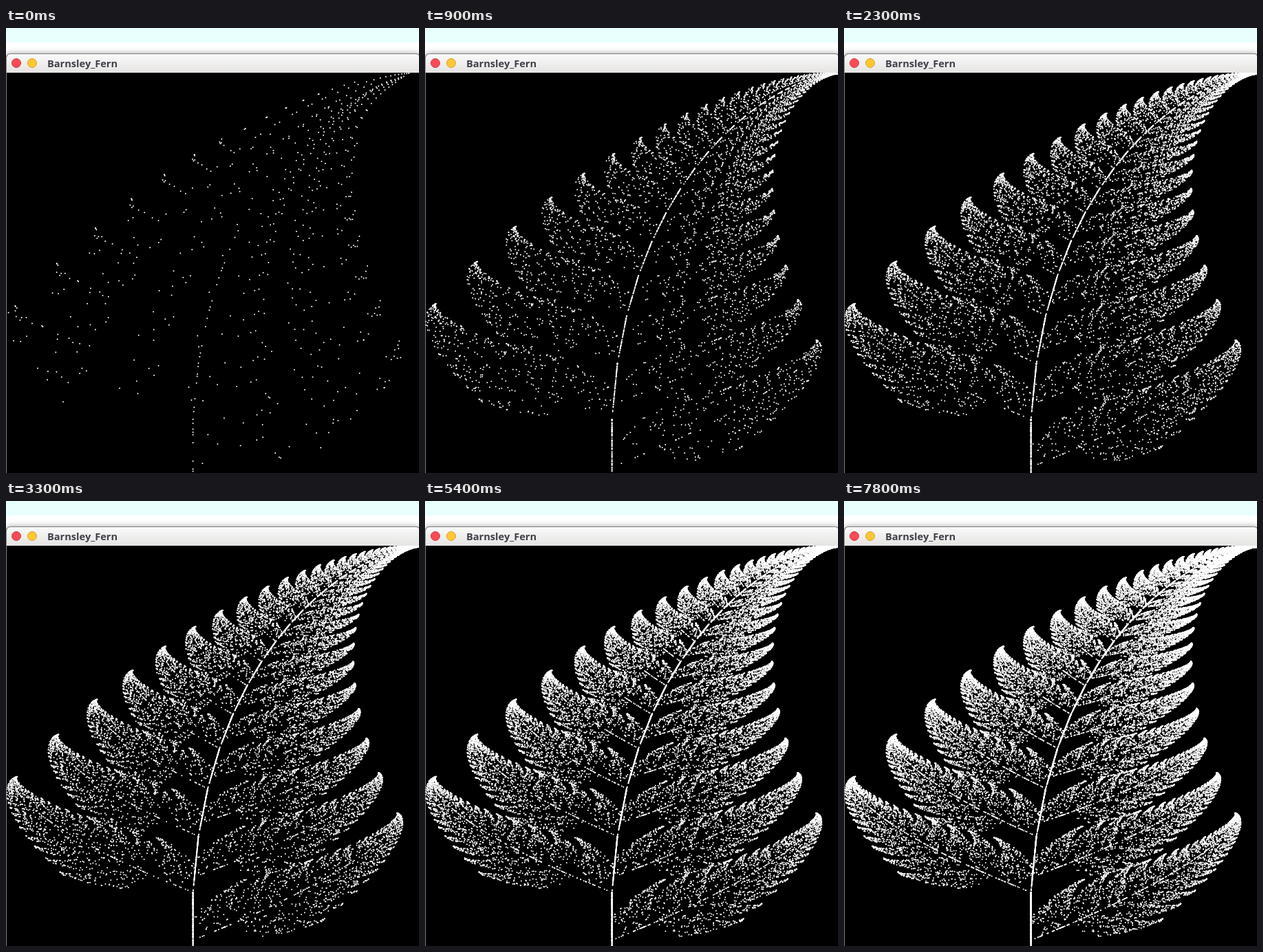
Recreate the animation shown at these times as an HTML page with a canvas. Size 600 by 647 pixels, loop 8 s.

```html
<!DOCTYPE html>
<html lang="en">
<head>
<meta charset="utf-8">
<title>Barnsley_Fern</title>
<style>
  html, body { margin: 0; width: 100%; height: 100%; overflow: hidden; background: #fff; }
  .stage { position: relative; width: 600px; height: 647px; overflow: hidden; }
  .stage > * { position: absolute; }
  .strip { left: 0; top: 0; width: 600px; height: 21px; background: #e8fffd; }
  .window {
    left: 0; top: 37px; width: 602px; height: 640px; box-sizing: border-box;
    border: 1px solid #828282; border-radius: 6px 6px 0 0; background: #000;
    box-shadow: 0 0 9px rgba(0, 0, 0, .38);
  }
  .bar {
    left: 1px; top: 38px; width: 600px; height: 27px; border-radius: 5px 5px 0 0;
    background: linear-gradient(#fafafa, #e5e4e3);
  }
  .button { top: 44px; width: 14px; height: 14px; box-sizing: border-box; border-radius: 50%; }
  .close { left: 8px; background: #fb4b56; border: 1px solid #cf3f47; }
  .shrink { left: 31px; background: #fdc834; border: 1px solid #d9a02f; }
  .title {
    left: 60px; top: 41px; line-height: 21px; white-space: nowrap; color: #40404a;
    font: 700 14.6px/21px "Open Sans", "Noto Sans", sans-serif;
  }
  canvas { left: 1px; top: 65px; }
</style>
</head>
<body>
<div class="stage">
  <div class="strip"></div>
  <div class="window"></div>
  <div class="bar"></div>
  <div class="button close"></div>
  <div class="button shrink"></div>
  <div class="title">Barnsley_Fern</div>
  <canvas width="599" height="582"></canvas>
</div>
<script>
const LOOP = 8000, FIRST = 650, RATE = 5.9, SIZE = 600;
const ctx = document.querySelector('canvas').getContext('2d');

// The drawing advances every 100 ms at first, then at irregular moments.
const lateSteps = [3300, 3500, 3700, 4000, 4200, 4300, 4800, 5000, 5200, 5400,
  5600, 5800, 6200, 6500, 6600, 6800, 7000, 7100, 7600, 7800];

function lastStep(t) {
  let step = Math.min(Math.floor(t / 100) * 100, 2400);
  for (const s of lateSteps) if (s <= t) step = s;
  return step;
}

const countAt = t => Math.round(FIRST + RATE * lastStep(t));

function seeded(a) {
  return () => {
    a = (a + 0x6D2B79F5) | 0;
    let t = Math.imul(a ^ (a >>> 15), 1 | a);
    t = (t + Math.imul(t ^ (t >>> 7), 61 | t)) ^ t;
    return ((t ^ (t >>> 14)) >>> 0) / 4294967296;
  };
}

function nextPoint(x, y, r) {
  if (r < 0.01) return [0, 0.16 * y];
  if (r < 0.86) return [0.85 * x + 0.04 * y, -0.04 * x + 0.85 * y + 1.6];
  if (r < 0.93) return [0.2 * x - 0.26 * y, 0.23 * x + 0.22 * y + 1.6];
  return [-0.15 * x + 0.28 * y, 0.26 * x + 0.24 * y + 0.44];
}

function growFern(total) {
  const random = seeded(7), points = new Float32Array(total * 2);
  let x = 0, y = 0;
  for (let i = 0; i < total; i++) {
    points[2 * i] = SIZE * (x + 2.182) / 4.8378;
    points[2 * i + 1] = SIZE * (1 - y / 9.9983);
    [x, y] = nextPoint(x, y, random());
  }
  return points;
}

const points = growFern(countAt(LOOP));
let drawn = 0, start;

function drawTo(count) {
  if (count < drawn) {
    ctx.clearRect(0, 0, SIZE, SIZE);
    drawn = 0;
  }
  ctx.fillStyle = '#fff';
  for (; drawn < count; drawn++) {
    ctx.beginPath();
    ctx.arc(points[2 * drawn], points[2 * drawn + 1], 1, 0, 2 * Math.PI);
    ctx.fill();
  }
}

function tick(now) {
  start ??= now;
  drawTo(countAt((now - start) % LOOP));
  requestAnimationFrame(tick);
}

drawTo(FIRST);
requestAnimationFrame(tick);
</script>
</body>
</html>
```
